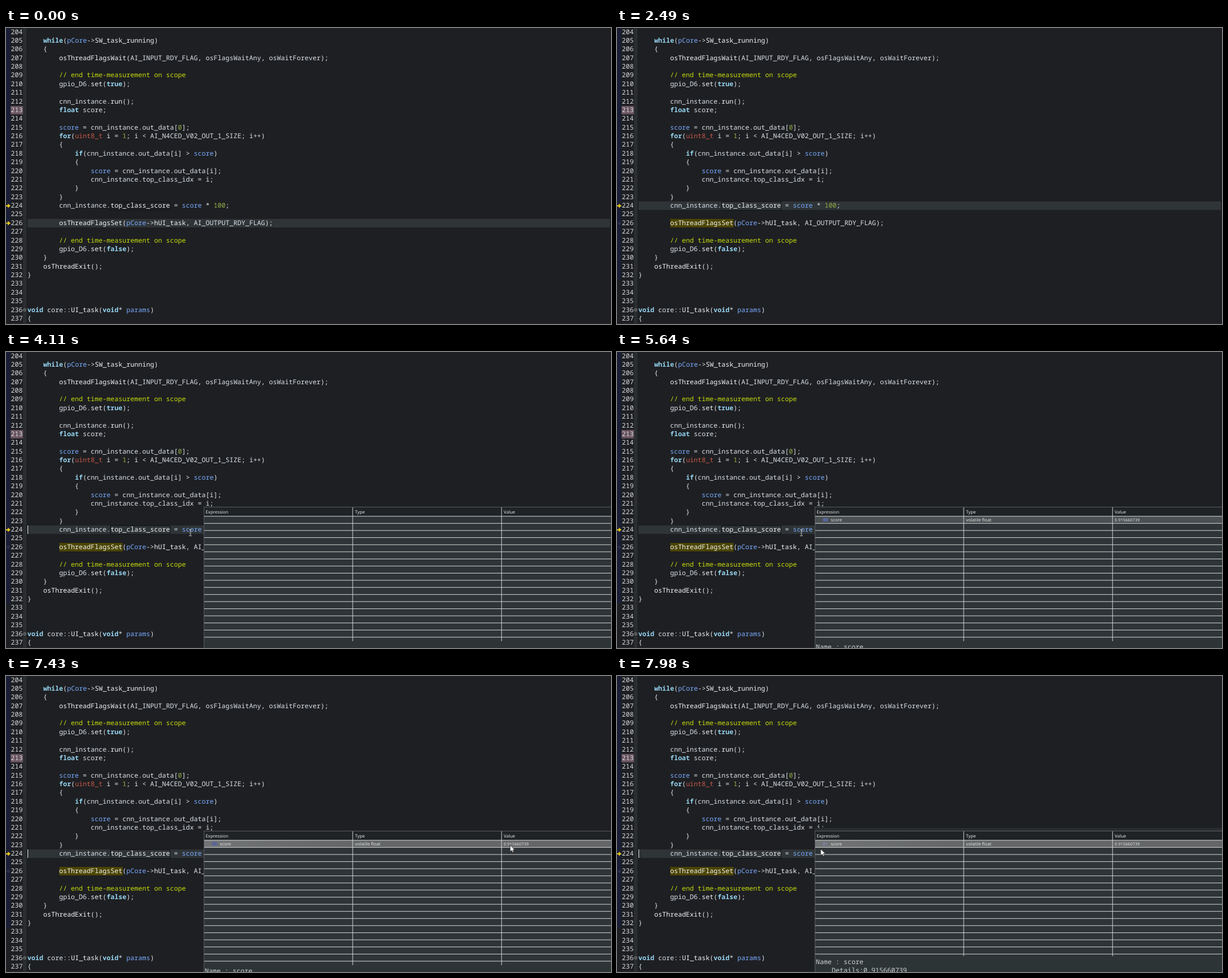
These frames come from a looping animation (1068x524 px, 8000 ms). An HTML page:

```html
<!DOCTYPE html>
<html lang="en">
<head>
<meta charset="utf-8">
<title>Debug inspection</title>
<style>
html, body { margin: 0; width: 100%; height: 100%; overflow: hidden; background: #1e1f22; }
#stage {
  position: relative; width: 1068px; height: 524px; overflow: hidden; color: #dce3ea;
  font: 11.66px/15.38px "Noto Sans Mono", "DejaVu Sans Mono", monospace;
  text-rendering: geometricPrecision; font-variant-ligatures: none;
}
#stage div, #stage pre, #stage svg, .panel span { position: absolute; }
pre { margin: 0; font: inherit; white-space: pre; }
svg { overflow: visible; left: 0; top: 0; }

/* syntax */
pre b { color: #95d5f1; }
pre i { color: #79abff; font-style: normal; }
pre u { color: #93b048; text-decoration: none; }
pre s { color: #c7dd0c; text-decoration: none; }
pre em { color: #c8594a; font-style: normal; }
pre q { color: #f2f4f6; quotes: none; }

/* editor */
.scope { left: 0; top: 0; width: 8px; height: 445px; background: #1a1e35; }
.fold { left: 30px; top: 0; width: 6px; height: 524px; background: #2b2e31; }
.mark { left: 8px; top: 138px; width: 22px; height: 15px; background: #69535f; }
.edge { left: 0; top: 523px; width: 1068px; height: 1px; background: #2c2727; }
#nums { left: 8.4px; top: -0.4px; color: #d8dbdd; }
#code { left: 37.7px; top: -0.4px; }
.line { left: 38px; top: 338px; width: 1028px; height: 15px; background: #2f3437; animation-name: line; }
.box { left: 184px; top: 307px; width: 104px; height: 14px; border: 1px solid #121315; }
.hit { left: 94px; top: 338px; width: 112px; height: 15px; background: #4c4500; animation-name: hit; }
.caret { width: 1px; height: 15px; background: #f0f0f0; }
.c226 { left: 149px; top: 338px; width: 2px; background: #b4b6b4; animation-name: c226; }
.c224 { left: 38px; top: 307px; animation-name: c224; }
.ip { fill: #e8c91c; }
.old { animation-name: old; }

/* popup */
.panel { left: 349px; top: 274px; width: 719px; height: 250px; background: #2e3437; animation-name: panel; }
.panel > * { left: 0; }
.head { width: 719px; height: 16px; background: #1f2326; }
.row { left: 1px; top: 17px; width: 718px; height: 12px; background: #4b5053; animation-name: data, hover; }
.grid { fill: none; stroke: #d6d9da; }
.panel span { font: 7.8px/12px "Noto Sans", "Open Sans", sans-serif; color: #e2e4e5; white-space: pre; }
.head span { top: 3.6px; }
.row span { top: .6px; }
.row .num { font-size: 7.4px; }
.row .pill { left: 13px; top: 3px; width: 10px; height: 6px; border-radius: 3px; background: #59649a; animation-name: pill; }
.row .var { left: 13px; color: #8d95ee; animation-name: grown; }
.info { top: 238px; width: 719px; height: 30px; background: #2d3436; animation-name: info; }
.info pre { left: 2px; top: 3px; color: #cdd1d2; animation-name: detail; }
.band { top: -5px; width: 719px; height: 5px; background: #2a2d30; animation-name: grown; }
.frame { width: 718px; height: 250px; border: solid #585c5f; border-width: 1px 0 0 1px; }

.mouse { animation-name: mouse; }
.beam { animation-name: beam; }
.arrow { animation-name: arrow; }

.line, .hit, .caret, .old, .panel, .row, .pill, .var, .info, .info pre, .band, .mouse, .beam, .arrow {
  animation-duration: 8s; animation-iteration-count: infinite; animation-timing-function: step-end;
}
@keyframes line { 22%, 100% { transform: translateY(-31px); } }
@keyframes hit { 0% { visibility: hidden; } 7.875%, 100% { visibility: inherit; } }
@keyframes old { 6.25%, 100% { fill: #2b3047; } }
@keyframes c226 {
  0%, 14.5%, 22%, 100% { opacity: 0; }
  6.25%, 21.125% { opacity: 1; }
}
@keyframes c224 {
  0%, 31.125%, 44.625%, 57.375%, 70.5%, 83.75%, 97% { opacity: 0; }
  22%, 37.875%, 51.375%, 63.875%, 77.125%, 90.375%, 99.7%, 100% { opacity: 1; }
}
@keyframes panel { 0% { opacity: 0; } 51.375%, 100% { opacity: 1; } }
@keyframes data { 0% { opacity: 0; } 53%, 100% { opacity: 1; } }
@keyframes hover { 77.25%, 100% { background: linear-gradient(90deg, #727475, #646668 36%); } }
@keyframes detail { 0% { opacity: 0; } 55.375%, 100% { opacity: 1; } }
@keyframes info { 98.875%, 100% { transform: translateY(-16px); } }
@keyframes grown { 0% { opacity: 0; } 98.875%, 100% { opacity: 1; } }
@keyframes pill { 98.875%, 100% { opacity: 0; } }
@keyframes beam { 0%, 72.1%, 100% { opacity: 0; } 32% { opacity: 1; } }
@keyframes arrow { 0% { opacity: 0; } 72.1%, 100% { opacity: 1; } }
@keyframes mouse {
  0%     { transform: translate(300px, 42px); }
  32%    { transform: translate(300px, 42px); animation-timing-function: steps(2); }
  33.75% { transform: translate(310px, 120px); animation-timing-function: steps(3); }
  36.25% { transform: translate(324px, 245px); animation-timing-function: steps(2); }
  38%    { transform: translate(330px, 300px); animation-timing-function: steps(3); }
  40.5%  { transform: translate(326.5px, 320px); }
  41.25% { transform: translate(326px, 320px); }
  44.5%  { transform: translate(325.5px, 320px); }
  70.5%  { transform: translate(325.5px, 320px); animation-timing-function: steps(2); }
  72.1%  { transform: translate(352px, 338px); animation-timing-function: steps(2); }
  73.75% { transform: translate(450px, 356px); animation-timing-function: steps(2); }
  75.4%  { transform: translate(630px, 358px); animation-timing-function: steps(3); }
  77.9%  { transform: translate(820px, 322px); animation-timing-function: steps(2); }
  79.75% { transform: translate(887.5px, 299.5px); animation-timing-function: steps(3); }
  82.5%  { transform: translate(900px, 303px); animation-timing-function: steps(3); }
  85%    { transform: translate(911px, 307px); animation-timing-function: steps(4); }
  88.4%  { transform: translate(898px, 303px); animation-timing-function: steps(3); }
  90.9%  { transform: translate(886px, 298px); animation-timing-function: steps(2); }
  92.75% { transform: translate(890px, 299.5px); animation-timing-function: steps(3); }
  95.2%  { transform: translate(740px, 285px); animation-timing-function: steps(3); }
  97.6%  { transform: translate(480px, 296px); animation-timing-function: steps(2); }
  99.6%, 100% { transform: translate(359.5px, 306px); }
}
</style>
</head>
<body>
<div id="stage">
  <div class="scope"></div>
  <div class="fold"></div>
  <div class="mark"></div>
  <div class="edge"></div>
  <div class="line"></div>
  <div class="box"></div>
  <div class="hit"></div>
  <pre id="nums"></pre>
  <pre id="code">

    <b>while</b>(<i>pCore</i>-&gt;<q>SW_task_running</q>)
    {
        <q>osThreadFlagsWait</q>(AI_INPUT_RDY_FLAG, osFlagsWaitAny, osWaitForever);

        <s>// end time-measurement on scope</s>
        gpio_D6.<q>set</q>(<b>true</b>);

        cnn_instance.<q>run</q>();
        <b>float</b> score;

        <i>score</i> = cnn_instance.out_data[<u>0</u>];
        <b>for</b>(<em>uint8_t</em> i = <u>1</u>; i &lt; AI_N4CED_V02_OUT_1_SIZE; i++)
        {
            <b>if</b>(cnn_instance.out_data[i] &gt; <i>score</i>)
            {
                <i>score</i> = cnn_instance.out_data[i];
                cnn_instance.top_class_idx = i;
            }
        }
        cnn_instance.<q>top_class_score</q> = <i>score</i> * <u>100</u>;

        <q>osThreadFlagsSet</q>(<i>pCore</i>-&gt;<q>hUI_task</q>, AI_OUTPUT_RDY_FLAG);

        <s>// end time-measurement on scope</s>
        gpio_D6.<q>set</q>(<b>false</b>);
    }
    <q>osThreadExit</q>();
}



<b>void</b> core::<q>UI_task</q>(<b>void</b>* <i>params</i>)
{</pre>
  <svg width="40" height="524">
    <path class="ip" d="M0 313.7H3.2V310.8L8 314.8L3.2 318.8V315.9H0Z"/>
    <path class="ip old" d="M0 344.4H3.2V341.5L8 345.5L3.2 349.5V346.6H0Z"/>
    <circle cx="33" cy="499" r="2.4" fill="none" stroke="#8a8d90" stroke-width=".9"/>
    <path d="M31.7 499H34.3" stroke="#8a8d90" stroke-width=".9"/>
  </svg>
  <div class="caret c226"></div>
  <div class="caret c224"></div>

  <div class="panel">
    <div class="head">
      <span style="left:3.5px">Expression</span>
      <span style="left:267px">Type</span>
      <span style="left:529.5px">Value</span>
    </div>
    <div class="row">
      <div class="pill"></div>
      <span class="var">X=</span>
      <span style="left:27.5px">score</span>
      <span style="left:266px">volatile float</span>
      <span class="num" style="left:528.5px">0.915660739</span>
    </div>
    <svg width="719" height="250"><path class="grid" id="grid"/></svg>
    <div class="info"><pre>Name : score
    Details:0.915660739</pre></div>
    <div class="band"></div>
    <div class="frame"></div>
  </div>

  <svg class="mouse" width="12" height="16">
    <path class="beam" d="M-2.5 -5.5H-.6M.6 -5.5H2.5M0 -5V5M-2.5 5.5H-.6M.6 5.5H2.5" fill="none" stroke="#e4e4e4"/>
    <path class="arrow" d="M0 0V11.6L2.7 9.2L4.5 13L6.4 12.1L4.7 8.5H8.2Z" fill="#fff" stroke="#111" stroke-width=".7"/>
  </svg>
</div>
<script>
const byId = id => document.getElementById(id);

byId('nums').textContent = Array.from({ length: 34 }, (_, i) => 204 + i).join('\n');

// Column dividers, then the evenly spaced row rules.
let d = 'M263 1V238M525.8 1V238';
for (let i = 0; i < 18; i++) d += `M0 ${16.8 + i * 12.59}H719`;
byId('grid').setAttribute('d', d);
</script>
</body>
</html>
```
